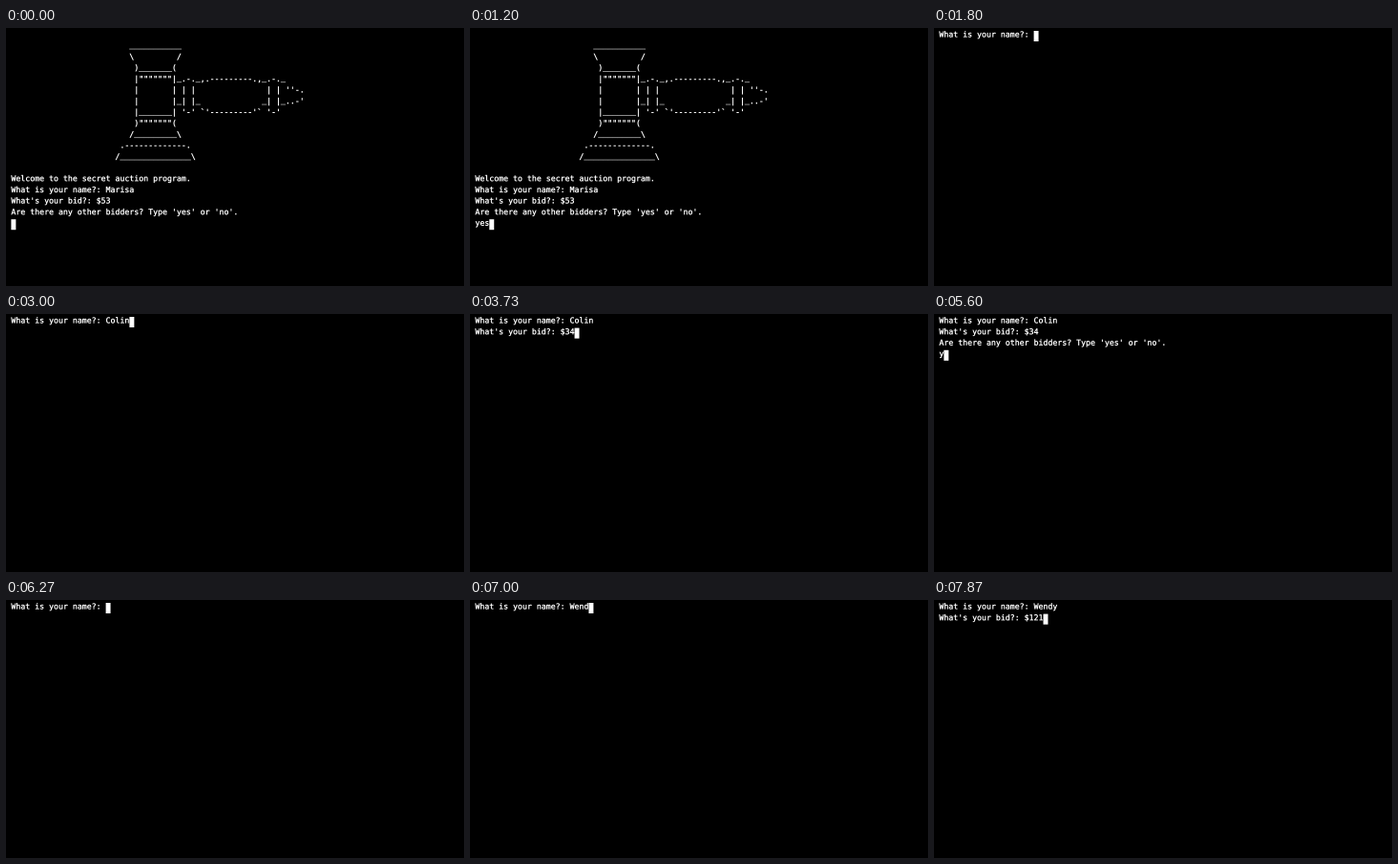
Animation of 480 by 270 pixels, one loop 8 s. Source, as an HTML page with a canvas:

```html
<!DOCTYPE html>
<html lang="en">
<head>
<meta charset="utf-8">
<title>Secret auction</title>
<style>
html, body { margin: 0; width: 100%; height: 100%; overflow: hidden; background: #000; }
canvas { display: block; width: 480px; height: 270px; }
</style>
</head>
<body>
<canvas id="stage" width="480" height="270"></canvas>
<script>
const WIDTH = 480, HEIGHT = 270, LOOP = 8000;
const LEFT = 5.4, TOP = 2.7, CELL_W = 4.96, CELL_H = 11.6;
const BASELINE = 6.85, UNDERSCORE_RISE = 0.9;
const CURSOR_TOP = 0.3, CURSOR_H = 11;

// Text is drawn enlarged and scaled down, so rows can sit between whole pixels.
const SCALE = 4;
const stage = document.getElementById('stage').getContext('2d');
stage.imageSmoothingQuality = 'high';
const large = document.createElement('canvas');
large.width = WIDTH * SCALE;
large.height = HEIGHT * SCALE;
const ctx = large.getContext('2d');
ctx.scale(SCALE, SCALE);
ctx.font = '8.24px "DejaVu Sans Mono", monospace';
ctx.textRendering = 'geometricPrecision';
ctx.strokeStyle = '#fff';
ctx.lineWidth = 0.3;
ctx.lineJoin = 'round';

const gavel = [
  '   ___________',
  '   \\         /',
  '    )_______(',
  '    |"""""""|_.-._,.---------.,_.-._',
  "    |       | | |               | | ''-.",
  "    |       |_| |_             _| |_..-'",
  "    |_______| '-' `'---------'` '-'",
  '    )"""""""(',
  '   /_________\\',
  ' .-------------.',
  '/_______________\\'
].map(row => ' '.repeat(22) + row);

const askName = name => 'What is your name?: ' + name;
const askBid = bid => "What's your bid?: $" + bid;
const askMore = "Are there any other bidders? Type 'yes' or 'no'.";

const intro = ['', ...gavel, '', 'Welcome to the secret auction program.',
  askName('Marisa'), askBid('53'), askMore];
const second = [askName('Colin'), askBid('34'), askMore];

const steps = [];

// Shows the fixed lines, then the prompt line growing by one character per time.
function type(lines, prompt, text, times, from = 0) {
  times.forEach((at, i) =>
    steps.push({ at, lines: [...lines, prompt + text.slice(0, from + i)] }));
}

type(intro, '', 'yes', [0, 870, 1000, 1200]);
type([], askName(''), 'Colin', [1800, 2470, 2600, 2800, 2900, 3000]);
type([askName('Colin')], askBid(''), '', [3530]);
type([askName('Colin')], askBid(''), '34', [3730], 2);
type(second, '', 'yes', [4200, 5600, 5730, 5870]);
type([], askName(''), 'Wendy', [6270, 6600, 6800, 6900, 7000, 7270]);
type([askName('Wendy')], askBid(''), '121', [7330, 7400, 7670, 7870]);

function write(text, y) {
  ctx.fillText(text, LEFT, y);
  ctx.strokeText(text, LEFT, y);
}

function draw(lines) {
  ctx.fillStyle = '#000';
  ctx.fillRect(0, 0, WIDTH, HEIGHT);
  ctx.fillStyle = '#fff';
  lines.forEach((line, row) => {
    const y = TOP + row * CELL_H + BASELINE;
    write(line.replace(/_/g, ' '), y);
    write(line.replace(/[^_]/g, ' '), y - UNDERSCORE_RISE);
  });
  const row = lines.length - 1;
  ctx.fillRect(LEFT + lines[row].length * CELL_W, TOP + row * CELL_H + CURSOR_TOP, CELL_W, CURSOR_H);
  stage.drawImage(large, 0, 0, WIDTH, HEIGHT);
}

const start = performance.now();
let shown;
function tick() {
  const time = (performance.now() - start) % LOOP;
  const step = steps.findLast(({ at }) => at <= time);
  if (step !== shown) draw(step.lines);
  shown = step;
  requestAnimationFrame(tick);
}
tick();
</script>
</body>
</html>
```
